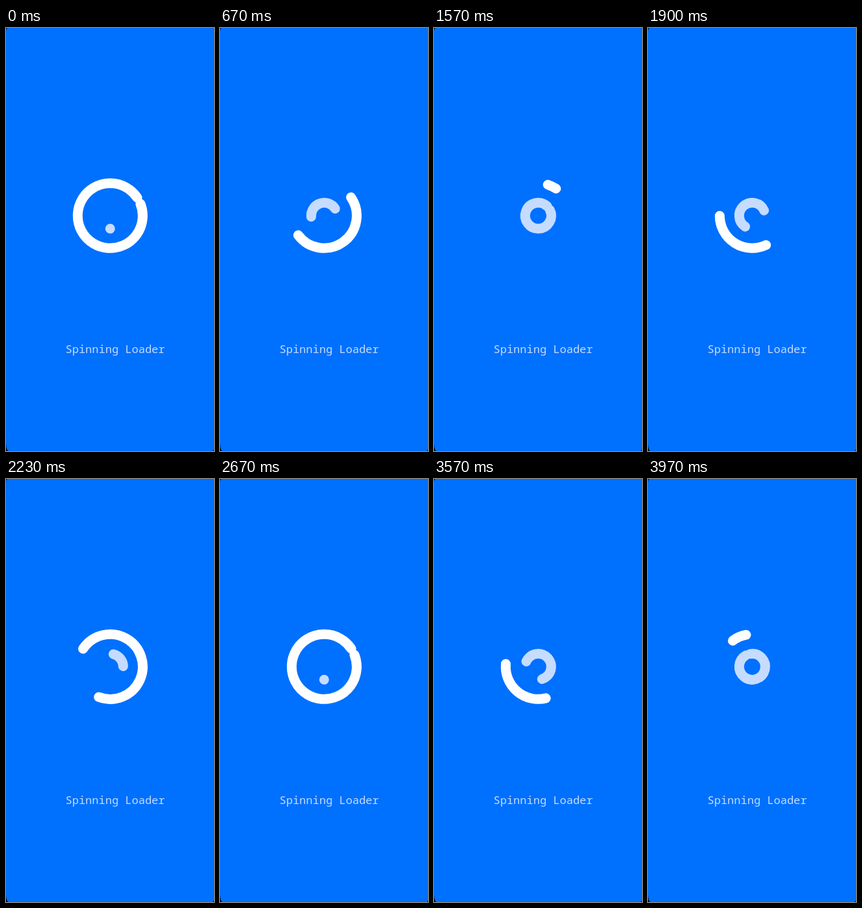
Animation, 320 px wide and 652 px high, one loop 4.01 s. Source, as an HTML page:

```html
<!DOCTYPE html>
<html lang="en">
<head>
<meta charset="utf-8">
<title>Spinning Loader</title>
<style>
  html, body { margin: 0; width: 100%; height: 100%; overflow: hidden; background: #000; }
  svg { display: block; width: 320px; height: 652px; background: #0070ff;
        border-radius: 2px 0 3px 4px / 6px 0 3px 12px; }
  path { fill: none; stroke-width: 15; stroke-linecap: round; }
  text { font: 17px "Noto Sans Mono", "DejaVu Sans Mono", monospace; fill: #c5dcff; }
</style>
</head>
<body>
<svg viewBox="0 0 320 652">
  <path id="outer" stroke="#fff"/>
  <path id="inner" stroke="#c5dcff"/>
  <text x="91.5" y="501">Spinning Loader</text>
</svg>
<script>
const LOOP = 4010, CYCLE = 2670, CX = 160.3, CY = 289.3;
const times = [0, 560, 670, 1300, 1570, 2230, CYCLE];

// Arc ends in degrees, clockwise from east, at each of the times.
const rings = [
  { id: "outer", r: 50,
    tail: [-22, 265, 325, 593, 647, 933, 1058],
    head: [326, 485.5, 503, 619, 663, 1190, 1406] },
  { id: "inner", r: 20,
    tail: [90, 161.5, 175, 261, 333, 644, 810],
    head: [90, 280, 327, 601, 673, 718, 810] }
];

// Monotone cubic curve through the points; its slopes repeat every cycle.
function curve(values) {
  const n = times.length - 1;
  const rate = i => (values[i + 1] - values[i]) / (times[i + 1] - times[i]);
  const slope = i => {
    const a = rate((i + n - 1) % n), b = rate(i % n);
    return a * b > 0 ? 2 * a * b / (a + b) : 0;
  };
  return t => {
    let i = 0;
    while (i < n - 1 && t >= times[i + 1]) i++;
    const h = times[i + 1] - times[i], u = (t - times[i]) / h, v = 1 - u;
    return v * v * ((1 + 2 * u) * values[i] + u * h * slope(i))
         + u * u * ((1 + 2 * v) * values[i + 1] - v * h * slope(i + 1));
  };
}

function arc(r, from, to) {
  const point = deg => {
    const a = deg * Math.PI / 180;
    return `${CX + r * Math.cos(a)} ${CY + r * Math.sin(a)}`;
  };
  const sweep = Math.min(359, Math.max(0.1, to - from));
  return `M${point(from)}A${r} ${r} 0 ${+(sweep > 180)} 1 ${point(from + sweep)}`;
}

const parts = rings.map(({ id, r, tail, head }) =>
  ({ path: document.getElementById(id), r, tail: curve(tail), head: curve(head) }));

function draw() {
  const t = performance.now() % LOOP % CYCLE;
  for (const { path, r, tail, head } of parts)
    path.setAttribute("d", arc(r, tail(t), head(t)));
  requestAnimationFrame(draw);
}
draw();
</script>
</body>
</html>
```
